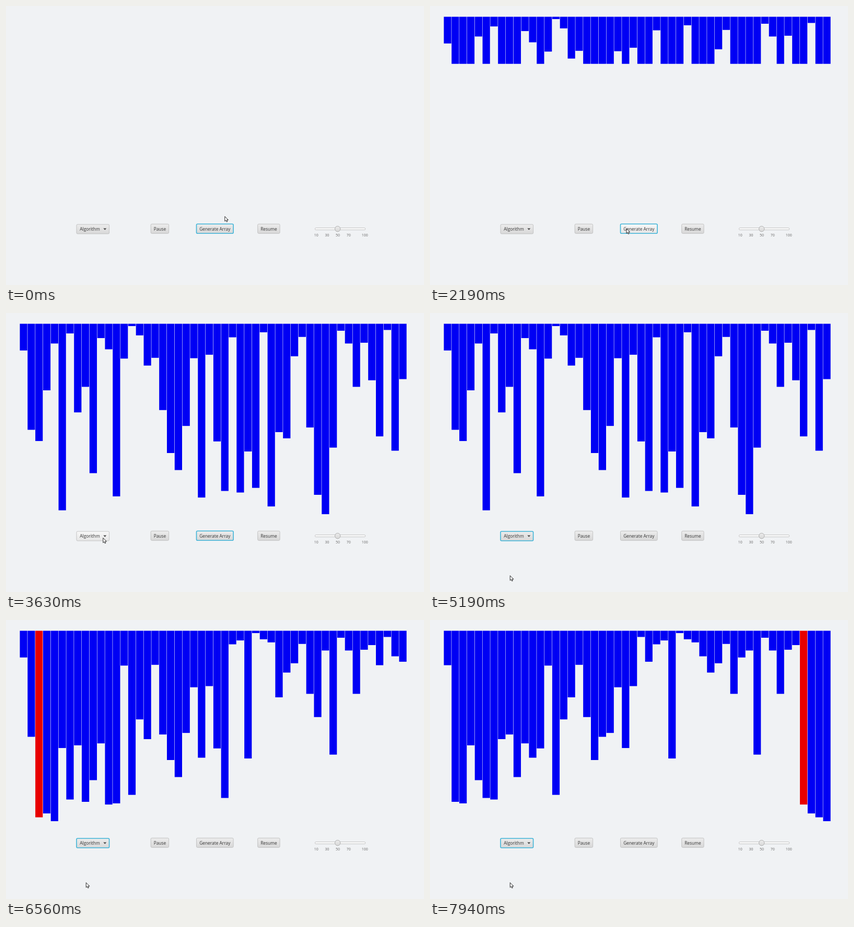
These frames come from a looping animation (800x534 px, 8 s). An HTML page:

```html
<!DOCTYPE html>
<html lang="en">
<head>
<meta charset="utf-8">
<title>Sorting visualizer</title>
<style>
  html, body { margin: 0; height: 100%; overflow: hidden; background: #f0f2f4; }
  svg { display: block; width: 100vw; height: 100vh; }
  text { font: 8.4px "Open Sans", "Noto Sans", sans-serif; fill: #333; text-anchor: middle; }
  .tick { font-size: 7px; fill: #666; }
  .box { fill: url(#normal); stroke: #b8b8b8; stroke-width: .8; }
  .hover .box { fill: url(#light); }
  .pressed .box { fill: url(#dark); }
  .focus .box { stroke: #3fb4d8; stroke-width: 1.6; }
</style>
</head>
<body>
<svg viewBox="0 0 800 534">
  <defs>
    <linearGradient id="normal" x2="0" y2="1"><stop stop-color="#ececec"/><stop offset="1" stop-color="#d8d8d8"/></linearGradient>
    <linearGradient id="light" x2="0" y2="1"><stop stop-color="#f8f8f8"/><stop offset="1" stop-color="#e6e6e6"/></linearGradient>
    <linearGradient id="dark" x2="0" y2="1"><stop stop-color="#d6d6d6"/><stop offset="1" stop-color="#c8c8c8"/></linearGradient>
  </defs>
  <g id="bars"></g>
  <g id="buttons"></g>
  <path d="M186.3 425.6h6l-3 3.2z" fill="#444"/>
  <rect x="591.4" y="424.6" width="96.4" height="4" rx="2" fill="#f8f8f8" stroke="#b9b9b9" stroke-width=".8"/>
  <circle cx="634.7" cy="426.6" r="5.2" fill="url(#normal)" stroke="#a6a6a6" stroke-width=".9"/>
  <g id="ticks"></g>
  <path id="cursor" d="M0 0V9.2L2.1 7.3 3.5 10.4 5.1 9.7 3.8 6.7H6.6Z" fill="#fff" stroke="#111" stroke-width=".9"/>
</svg>
<script>
const LOOP = 8000;
const SCALE = 800 / 1080;                 // array units to stage pixels
const TOP = 20.6, LEFT = 26.5, PITCH = 20 * SCALE, BAR_WIDTH = 14.2;
const GROW_START = 1617, GROW_COST = 0.122;   // ms per unit and unfinished bar
const SORT_START = 5272, SWAP_TIME = 50.7;
const CLICK_GENERATE = 1500, CLICK_ALGORITHM = 3760;

// The unsorted array that the page displays
const values = [
  69, 274, 303, 172, 51, 482, 25, 229, 163, 386, 37, 66, 446, 90, 6, 30, 108,
  88, 223, 334, 378, 264, 89, 449, 80, 304, 432, 35, 436, 330, 424, 22, 472, 280,
  296, 84, 34, 268, 442, 492, 320, 18, 51, 163, 49, 146, 291, 16, 328, 143
];
const COUNT = values.length;
const ascending = [...values].sort((a, b) => a - b);

// Pointer stops
const pointer = [
  { t: 0, x: 418.8, y: 402.8 },
  { t: 400, x: 408, y: 371 },
  { t: 1100, x: 382, y: 434 },
  { t: 2200, x: 376, y: 426 },
  { t: 3500, x: 185.8, y: 430.5 },
  { t: CLICK_ALGORITHM, x: 185.8, y: 430.5 },
  { t: 4500, x: 153.3, y: 502.7 }
];

const byId = id => document.getElementById(id);

function add(parent, tag, attributes, content = "") {
  const node = document.createElementNS("http://www.w3.org/2000/svg", tag);
  for (const key in attributes) node.setAttribute(key, attributes[key]);
  node.textContent = content;
  return parent.appendChild(node);
}

function addButton(label, center, width, y = 417.3, textX = center) {
  const group = add(byId("buttons"), "g", {});
  add(group, "rect", { class: "box", x: center - width / 2, y, width, height: 18, rx: 2 });
  add(group, "text", { x: textX, y: y + 12.3 }, label);
  return group;
}

const algorithm = addButton("Algorithm", 166.3, 62.6, 418, 160.5);
addButton("Pause", 294.4, 34.4);
const generate = addButton("Generate Array", 399.8, 70.6);
addButton("Resume", 502.9, 42.4);

for (const value of [10, 30, 50, 70, 100])
  add(byId("ticks"), "text", { class: "tick", x: 583.4 + 1.033 * value, y: 440.8 }, value);

const bars = values.map((_, i) =>
  add(byId("bars"), "rect", { x: LEFT + i * PITCH, y: TOP, width: BAR_WIDTH }));

// Heap sort, recorded as [highlighted index, other index]
function recordSwaps(source) {
  const a = [...source], swaps = [];
  const swap = (i, j) => {
    [a[i], a[j]] = [a[j], a[i]];
    swaps.push([i, j]);
  };
  const sift = (i, size) => {
    for (;;) {
      let largest = i;
      for (const child of [2 * i + 1, 2 * i + 2])
        if (child < size && a[child] > a[largest]) largest = child;
      if (largest === i) return;
      swap(i, largest);
      i = largest;
    }
  };
  for (let i = COUNT / 2 - 1; i >= 0; i--) sift(i, COUNT);
  for (let end = COUNT - 1; end > 0; end--) {
    swap(end, 0);
    sift(0, end);
  }
  return swaps;
}
const swaps = recordSwaps(values);

// Bars grow in turns, so the pace rises as the short ones finish
function growthLimit(t) {
  let budget = Math.max(0, (t - GROW_START) / GROW_COST), limit = 0;
  ascending.forEach((value, i) => {
    const active = COUNT - i;
    const spent = Math.min(budget, (value - limit) * active);
    limit += spent / active;
    budget -= spent;
  });
  return limit;
}

function drawBars(t) {
  const limit = growthLimit(t);
  const shown = values.map(value => Math.min(value, limit));
  const done = Math.max(0, Math.floor((t - SORT_START) / SWAP_TIME));
  let red = -1;
  for (const [i, j] of swaps.slice(0, done)) {
    [shown[i], shown[j]] = [shown[j], shown[i]];
    red = i;
  }
  bars.forEach((bar, i) => {
    bar.setAttribute("height", shown[i] * SCALE);
    bar.setAttribute("fill", i === red ? "#e80000" : "#0000f4");
  });
}

function pointerAt(t) {
  const next = pointer.findIndex(stop => stop.t > t);
  if (next < 0) return pointer.at(-1);
  const from = pointer[next - 1], to = pointer[next];
  const p = (t - from.t) / (to.t - from.t), ease = p * p * (3 - 2 * p);
  return { x: from.x + (to.x - from.x) * ease, y: from.y + (to.y - from.y) * ease };
}

function drawButton(button, { x, y }, focused, pressed) {
  const box = button.firstChild.getBBox();
  const hover = x > box.x && x < box.x + box.width && y > box.y && y < box.y + box.height;
  button.classList.toggle("hover", hover);
  button.classList.toggle("pressed", pressed);
  button.classList.toggle("focus", focused);
}

function draw(now) {
  const t = now % LOOP;
  const tip = pointerAt(t);
  const pressed = t >= CLICK_GENERATE && t < CLICK_GENERATE + 110;
  drawBars(t);
  drawButton(algorithm, tip, t >= CLICK_ALGORITHM, false);
  drawButton(generate, tip, t < CLICK_ALGORITHM, pressed);
  byId("cursor").setAttribute("transform", `translate(${tip.x} ${tip.y})`);
}

let start;
function frame(now) {
  start ??= now;
  draw(now - start);
  requestAnimationFrame(frame);
}
draw(0);
requestAnimationFrame(frame);
</script>
</body>
</html>
```
